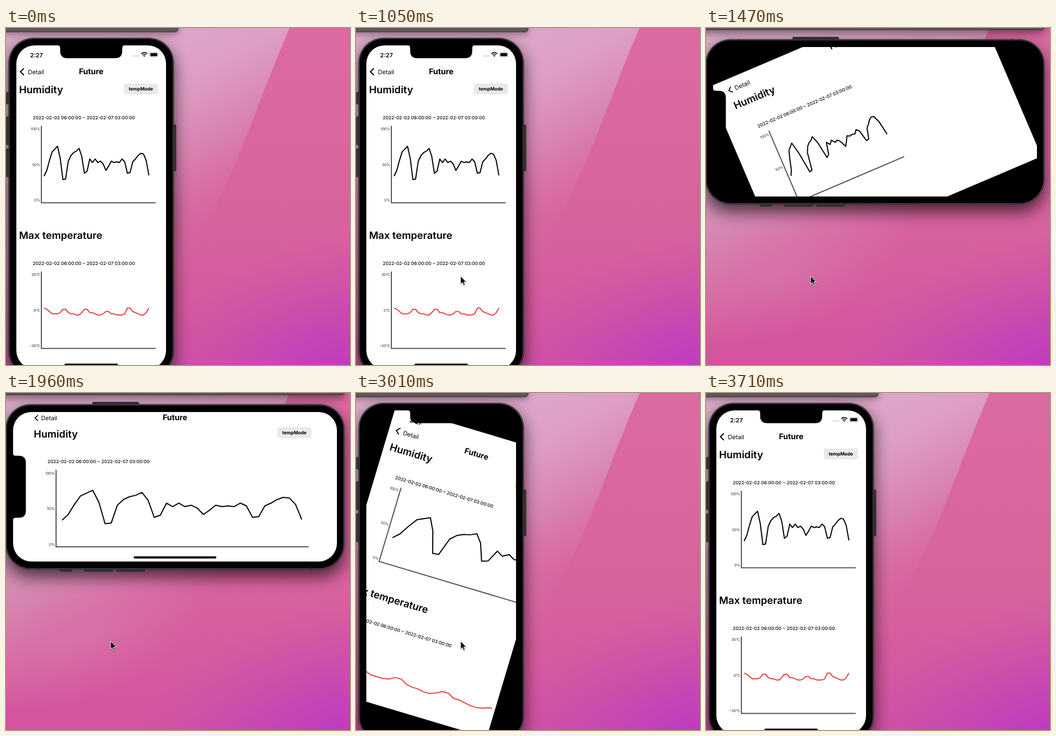
An HTML page for the animation above (4550 ms loop, 632 by 620 pixels).

```html
<!DOCTYPE html>
<html lang="en">
<head>
<meta charset="utf-8">
<title>Rotating charts</title>
<style>
  html, body { margin: 0; width: 100%; height: 100%; overflow: hidden; background: #d8639d; }
  svg { display: block; width: 632px; height: 620px; font-family: Inter, "Open Sans", sans-serif; text-rendering: geometricPrecision; }
  .h { font-size: 18.5px; font-weight: 600; }
  .date { font-size: 8.35px; font-weight: 500; }
  .tick { font-size: 6.6px; text-anchor: end; fill: #222; }
  .axis { fill: none; stroke: #555; stroke-width: 2; }
  .line { fill: none; stroke-width: 2; stroke-linejoin: round; }
</style>
</head>
<body>
<svg viewBox="0 0 632 620">
  <defs>
    <linearGradient id="base" x2="0" y2="1">
      <stop offset="0" stop-color="#dc6aa2"/>
      <stop offset=".55" stop-color="#d7639d"/>
      <stop offset="1" stop-color="#d4539f"/>
    </linearGradient>
    <radialGradient id="purple" gradientUnits="userSpaceOnUse" cx="0" cy="0" r="1" gradientTransform="translate(650 645) rotate(-12) scale(470 265)">
      <stop offset="0" stop-color="#bd36c6"/>
      <stop offset=".4" stop-color="#c444b8" stop-opacity=".85"/>
      <stop offset=".75" stop-color="#ca4fac" stop-opacity=".5"/>
      <stop offset="1" stop-color="#cf55a5" stop-opacity="0"/>
    </radialGradient>
    <linearGradient id="light" gradientUnits="userSpaceOnUse" x1="200" y1="0" x2="460" y2="480">
      <stop offset="0" stop-color="#dcabca"/>
      <stop offset=".27" stop-color="#dd9fc5"/>
      <stop offset=".5" stop-color="#d880af"/>
      <stop offset=".78" stop-color="#d766a0" stop-opacity="0"/>
    </linearGradient>
    <linearGradient id="haze" x2=".5" y2="1">
      <stop offset="0" stop-color="#c489ad" stop-opacity=".45"/>
      <stop offset="1" stop-color="#d07aa8" stop-opacity="0"/>
    </linearGradient>
    <radialGradient id="glow" gradientUnits="userSpaceOnUse" cx="0" cy="0" r="1" gradientTransform="translate(140 450) rotate(-20) scale(240 110)">
      <stop offset="0" stop-color="#d67cad" stop-opacity=".55"/>
      <stop offset="1" stop-color="#d67cad" stop-opacity="0"/>
    </radialGradient>
    <filter id="blur" x="-30%" y="-30%" width="160%" height="160%"><feGaussianBlur stdDeviation="15"/></filter>
    <filter id="soft" x="-10%" y="-100%" width="120%" height="400%"><feGaussianBlur stdDeviation="7"/></filter>
    <clipPath id="glass"><rect x="-137.5" y="-297.5" width="275" height="595" rx="33.5"/></clipPath>
    <clipPath id="safe"><rect id="safeBox"/></clipPath>
  </defs>

  <rect width="632" height="620" fill="url(#base)"/>
  <path d="M0 0H521C500 48 480 100 455 165S400 305 358 375L200 620H0Z" fill="url(#light)"/>
  <path d="M0 290H205C192 330 172 366 150 392S70 450 0 470Z" fill="url(#haze)"/>
  <rect width="632" height="620" fill="url(#glow)"/>
  <rect width="632" height="620" fill="url(#purple)"/>

  <rect id="barShade" x="-20" y="-16" height="26" fill="#000" opacity=".42" filter="url(#soft)"/>
  <rect id="shade" rx="44" fill="#000" opacity=".66" filter="url(#blur)"/>
  <rect id="bar" x="-20" y="-20" rx="5" fill="#615759" stroke="#2b2628"/>

  <g id="device">
    <g id="keys" fill="#343135" stroke="#232124" stroke-width=".8"></g>
    <rect x="-152" y="-311.5" width="304" height="623" rx="46" fill="#1c1a1d"/>
    <rect x="-150.5" y="-310" width="301" height="620" rx="44.5" fill="#000" stroke="#4b484c" stroke-width="1.4"/>
    <path d="M-151.5-250h3M148.5-250h3M-151.5 250h3M148.5 250h3" stroke="#2a282b" stroke-width="3"/>
    <g clip-path="url(#glass)">
      <g id="page">
        <rect id="sheet" fill="#fff"/>
        <g clip-path="url(#safe)">
          <g id="body"></g>
          <g id="mode">
            <rect x="-62.5" y="70" width="62.5" height="20" rx="4" fill="#e9e9ea"/>
            <text x="-31.2" y="82.7" font-size="8.5" font-weight="700" text-anchor="middle">tempMode</text>
          </g>
        </g>
        <text id="title" y="5.1" font-size="14.4" font-weight="700" text-anchor="middle">Future</text>
        <path id="chevron" d="M3.2-6.2L-3.2 0 3.2 6.2" fill="none" stroke="#000" stroke-width="2"/>
        <text id="detail" y="4.2" font-size="11.1">Detail</text>
        <g id="status">
          <text id="clock" y="4" font-size="10.9" font-weight="600" text-anchor="middle">2:27</text>
          <g id="icons">
            <path d="M-61 2.5h12" stroke="#c4c4c6" stroke-width="2.2" stroke-dasharray="2.2 1"/>
            <path d="M-45.3-1.7a7.6 7.6 0 0 1 10.6 0M-43.3.6a4.7 4.7 0 0 1 6.6 0" fill="none" stroke="#000" stroke-width="1.7"/>
            <path d="M-41.8 2.1a2.6 2.6 0 0 1 3.6 0L-40 4Z"/>
            <rect x="-30" y="-4" width="15" height="8" rx="2.3" fill="none" stroke="#999" stroke-width=".8"/>
            <rect x="-28.8" y="-2.8" width="12.6" height="5.6" rx="1.3"/>
            <path d="M-13.8-1.3q1.5 1.3 0 2.6Z" fill="#999"/>
          </g>
        </g>
        <rect id="home" height="3.8" rx="1.9"/>
      </g>
    </g>
    <path d="M-61-299H61V-297.5Q57-297.5 57-292V-287Q57-274 44-274H-44Q-57-274-57-287V-292Q-57-297.5-61-297.5Z"/>
  </g>

  <path id="cursor" d="M192.2 456.6v14.6l3.3-3.1 2.3 5.3 2.5-1.1-2.3-5.1h4.6Z" stroke="#fff" stroke-width="1" stroke-linejoin="round" style="filter:drop-shadow(0 1px 1px rgba(0,0,0,.35))"/>
</svg>

<script>
const LOOP = 4550, STEP = 70, TURN = 446;
const humidity = [34, 42, 56, 68, 72, 76, 59, 29, 30, 55, 63, 67, 69, 73, 62, 38, 41, 58, 53, 58,
  53, 55, 51, 42, 48, 55, 53, 54, 53, 58, 54, 38, 39, 54, 58, 63, 66, 65, 56, 35];
const maxTemp = [2, 1, -1, -3, -3, -3, -2, 1, 1, -2, -3, -3, -4, -4, -2, 1, 1, -2, -2, -3,
  -4, -4, -3, -1, -1, -3, -3, -4, -4, -4, -3, 2, 2, -1, -2, -3, -4, -4, -2, 2];

const $ = id => document.getElementById(id);
const set = (id, attrs) => { for (const k in attrs) $(id).setAttribute(k, attrs[k]); };
const move = (id, x, y, extra = '') => set(id, { transform: `translate(${x} ${y}) ${extra}` });
const clamp = v => Math.max(0, Math.min(1, v));
const mix = (a, b, k) => a + (b - a) * k;

// cubic-bezier(.25, .1, .25, 1)
function ease(x) {
  if (x <= 0 || x >= 1) return clamp(x);
  let lo = 0, hi = 1, s;
  for (let i = 0; i < 24; i++) {
    s = (lo + hi) / 2;
    if (.75 * s * (1 - s) + s ** 3 < x) lo = s; else hi = s;
  }
  return .3 * s * (1 - s) ** 2 + 3 * (1 - s) * s * s + s ** 3;
}

const charts = [
  { name: 'Humidity', top: 148, color: '#000', ticks: ['100%', '50%', '0%'], data: humidity, y: v => 6 + (100 - v) * 1.31 },
  { name: 'Max temperature', top: 416, color: '#eb4337', ticks: ['30°C', '0°C', '−30°C'], data: maxTemp, y: v => 71.5 - v * 2.1 },
];

$('body').innerHTML = charts.map((c, n) => `
  <text class="h" x="5" y="${c.top - 60}">${c.name}</text>
  <text class="date" x="30.3" y="${c.top - 12.4}">2022-02-02 06:00:00 ~ 2022-02-07 03:00:00</text>
  ${c.ticks.map((s, i) => `<text class="tick" x="43.7" y="${c.top + 8.2 + i * 65.6}">${s}</text>`).join('')}
  <g transform="translate(46 ${c.top})">
    <path class="axis" id="axis${n}"/><polyline class="line" id="line${n}" stroke="${c.color}"/>
  </g>`).join('');

$('keys').innerHTML = [[-155.7, -211.5, 22], [-155.7, -166.5, 52], [-155.7, -107.5, 52], [149.7, -151.5, 85]]
  .map(([x, y, h]) => `<rect x="${x}" y="${y}" width="6" height="${h}" rx="1.5"/>`).join('');

function drawCharts(wide) {
  const x0 = wide ? 11 : 5, dx = wide ? 11.29 : 4.936;
  charts.forEach((c, n) => {
    set('axis' + n, { d: `M0 0V141.5H${wide ? 464 : 210}` });
    set('line' + n, { points: c.data.map((v, i) => `${x0 + i * dx},${c.y(v)}`).join(' ') });
  });
}

function drawDevice(wide) {
  const [cx, cy, hw, hh] = wide ? [310.5, 172.5, 311.5, 152] : [156.5, 329.5, 152, 311.5];
  move('device', cx, cy, wide ? 'rotate(-90)' : '');
  set('shade', { x: cx - hw, y: cy - hh + 13, width: hw * 2, height: hh * 2 });
  const right = wide ? 622 : 316;
  set('bar', { width: right + 20, height: wide ? 23 : 27 });
  set('barShade', { width: right + 20 });
}

// k runs from 0 (portrait) to 1 (landscape)
function drawPage(k) {
  const w = mix(275, 595, k), h = mix(595, 275, k), l = -w / 2, t = -h / 2;
  set('page', { transform: `rotate(${90 * k})` });
  set('sheet', { x: l, y: t, width: w, height: h });
  set('safeBox', { x: l + 33 * k, y: t, width: w - 66 * k, height: h });
  move('body', l + 33 * k, t - 41.5 * k);
  move('mode', -l - mix(15, 47, k), t - 42 * k);
  move('title', 0, t + mix(48, 10, k));
  move('chevron', l + mix(10.7, 43, k), t + mix(48.5, 11, k), `scale(${mix(1, .84, k)})`);
  move('detail', l + mix(21.3, 51.5, k), t + mix(48.8, 11, k));
  move('clock', l + mix(37, 72, k), t + mix(17.5, 9, k));
  move('icons', -l - 35 * k, t + mix(17, 9, k));
  const bar = mix(98, 152, k);
  set('home', { x: -bar / 2, y: -t - 9.4, width: bar });
}

function homeAlpha(t) {
  const fade = (from, steps) => clamp(((t - from) / STEP + 1) / steps);
  return t < 1260 ? 1 : t < 2800 ? fade(1820, 3) : fade(3360, 2);
}

function render(time) {
  const t = Math.floor(time % LOOP / STEP) * STEP;
  const wide = t >= 1260 && t < 2800;
  const k = ease((t - 1271) / TURN) - ease((t - 2781) / TURN);
  drawDevice(wide);
  drawPage(k);
  drawCharts(t >= 1820 && t < 3360);
  set('status', { display: wide ? 'none' : 'inline' });
  set('icons', { opacity: 1 - k });
  set('home', { opacity: homeAlpha(t) });
  set('cursor', { opacity: t < 1050 || t >= 3710 ? 0 : t < 3640 ? 1 : .5 });
}

const start = performance.now();
function tick() {
  render(performance.now() - start);
  requestAnimationFrame(tick);
}
tick();
</script>
</body>
</html>
```
